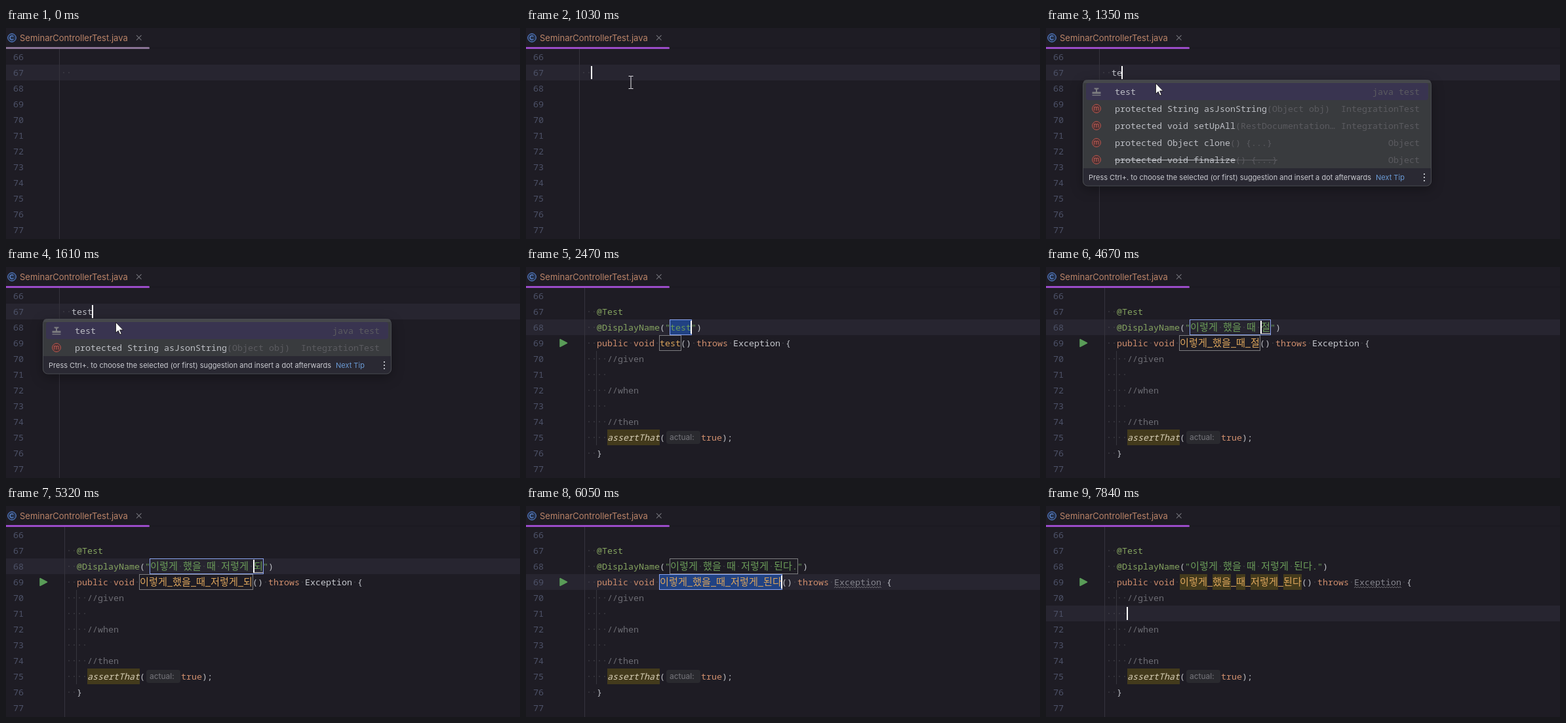
An HTML page that plays this animation: 784 by 322 pixels, repeating every 8370 ms.

```html
<!DOCTYPE html>
<html lang="ko">
<head>
<meta charset="utf-8">
<title>Live template</title>
<style>
html, body { margin: 0; width: 100%; height: 100%; overflow: hidden; background: #1e1c24; }
svg { display: block; }
text { white-space: pre; }
.mono { font: 13.333px "Noto Sans Mono", monospace; }
.ko { font: 15.2px "Noto Sans CJK KR", "Noto Sans CJK", sans-serif; }
.ui { font-family: Inter, sans-serif; }
.it { font-style: italic; }
.popup { filter: drop-shadow(0 5px 9px rgba(0,0,0,.3)); }
</style>
</head>
<body>
<svg id="stage" width="784" height="322" viewBox="0 0 784 322"></svg>
<script>
(() => {
const LOOP = 8370, ROW = 24, CH = 8, KO = 14;
const stage = document.getElementById('stage');
const C = {
  plain: '#bcbec4', note: '#86a560', str: '#6a9b58', key: '#cf8e6d', fn: '#dca55c',
  comment: '#6c6c73', dim: '#5b5b60', dot: '#56565e', warn: '#433a1c', box: '#7d7d80',
  active: '#8aa4f0', select: '#214283', caret: '#ffffff'
};
const sentence = '이렇게 했을 때 저렇게 된다.';

// [time, committed length, syllable being composed]
const typing = [
  [2540, 0, 'ㅇ'], [2680, 0, '이'], [2880, 0, '일'], [2980, 1, '러'], [3070, 1, '렇'],
  [3160, 2, 'ㄱ'], [3250, 2, '게'], [3380, 4, ''], [3540, 4, 'ㅎ'], [3610, 4, '해'],
  [3740, 4, '했'], [3870, 5, 'ㅇ'], [4010, 5, '으'], [4080, 5, '을'], [4210, 7, ''],
  [4280, 7, 'ㄸ'], [4350, 7, '때'], [4460, 9, ''], [4540, 9, 'ㅈ'], [4600, 9, '저'],
  [4670, 9, '절'], [4800, 10, '러'], [4860, 10, '렇'], [4930, 11, 'ㄱ'], [5000, 11, '게'],
  [5060, 13, ''], [5120, 13, 'ㄷ'], [5260, 13, '되'], [5330, 13, '된'], [5400, 14, 'ㄷ'],
  [5530, 14, '다'], [5600, 16, '']
];

// [name, tail, type, letters typed while still listed]
const suggestions = [
  ['test', '', 'java test', 4],
  ['protected String asJsonString', '(Object obj)', 'IntegrationTest', 4],
  ['protected void setUpAll', '(RestDocumentation…', 'IntegrationTest', 3],
  ['protected Object clone', '() {...}', 'Object', 2],
  ['protected void finalize', '() {...}', 'Object', 2]
];

const rowY = n => 32 + (n - 66) * ROW;
const isKo = c => /^[ㄱ-힣]/.test(c);
const width = s => [...s].reduce((w, c) => w + (isKo(c) ? KO : CH), 0);
const rect = (x, y, w, h, fill, more = '') =>
  `<rect x="${x}" y="${y}" width="${w}" height="${h}" fill="${fill}" ${more}/>`;
const outline = (x, y, w, color) =>
  rect(x - .5, y + .5, w + 1, ROW - 1, 'none', `stroke="${color}"`);
const path = (d, fill, more = '') => `<path d="${d}" fill="${fill}" ${more}/>`;
const text = (x, y, s, fill, cls = 'mono', more = '') =>
  `<text x="${x}" y="${y}" class="${cls}" fill="${fill}" ${more}>${s}</text>`;
const ui = (x, y, s, fill, size) => text(x, y, s, fill, 'ui', `font-size="${size}"`);
const dot = (x, n) => rect(x + 3.4, rowY(n) + 11.5, 1.2, 1.2, C.dot);
const dots = (x, n, count) =>
  Array.from({ length: count }, (_, i) => dot(x + i * CH, n)).join('');
const caret = (x, n) => rect(x - 1, rowY(n) + 2, 2, 20, C.caret);

// Lays out coloured pieces on one line, marking blanks with dots.
function code(x, n, ...pieces) {
  let out = '';
  for (const [s, color, cls = ''] of pieces) {
    for (const run of s.match(/[ㄱ-힣]+| |[^ㄱ-힣 ]+/g) || []) {
      out += run === ' ' ? dot(x, n)
        : text(x, rowY(n) + 17, run, color, (isKo(run) ? 'ko ' : 'mono ') + cls);
      x += width(run);
    }
  }
  return out;
}

function chrome(focused, gutter) {
  let out = rect(0, 30, 784, 1, '#19181f');
  out += '<circle cx="9" cy="15" r="6.3" fill="#25324d" stroke="#5c8be0"/>';
  out += path('M11.3 13A3 3 0 1 0 11.3 17', 'none', 'stroke="#6d9bea" stroke-width="1.1"');
  out += ui(21, 20, 'SeminarControllerTest.java', '#bb8468', 13);
  out += path('M199 11.2l7.5 7.5m0-7.5l-7.5 7.5', 'none', 'stroke="#73737a" stroke-width="1.1"');
  out += rect(-3, 29, 222, 3, focused ? '#9a4bc8' : '#8a7396', 'rx="1.5"');
  out += rect(gutter, 32, 1, 290, '#35333d');
  for (let n = 66; n < 78; n++) out += text(11, rowY(n) + 17, n, '#4d5268');
  return out;
}

function popup(rows) {
  const foot = 84 + rows.length * 26;
  let out = rect(56.5, 79.5, 531, foot - 52.5, '#393b3e', 'rx="7"');
  out += path('M57 84v-1a4 4 0 0 1 4-3.5h522a4 4 0 0 1 4 3.5v1z', '#46484b');
  out += rect(61, 84, 522, 26, '#393450', 'rx="4"');
  rows.forEach(([name, tail, type], i) => {
    const y = 97 + i * 26, end = 105 + width(name);
    if (i === 0) {
      out += path('M73.5 91.500h7v1.500l-2.500 1v3.500h5.500v3h-13v-3h5.500v-3.500l-2.500-1zM70.500 102h13v1.300h-13z', '#7d7d80');
    } else {
      out += `<circle cx="77" cy="${y}" r="6.4" fill="#4a3032" stroke="#c05a50"/>`;
      out += text(77, y + 3.3, 'm', '#d2675c', 'ui', 'font-size="10" text-anchor="middle"');
    }
    out += text(105, y + 5, name, C.plain) + text(end, y + 5, tail, C.dim);
    out += text(570 - width(type), y + 5, type, C.dim);
    if (name.endsWith('finalize')) {
      out += rect(105, y, end - 105, 1, C.plain) + rect(end, y, width(tail), 1, C.dim);
    }
  });
  out += path(`M57 ${foot}h530v19a8 8 0 0 1-8 8h-514a8 8 0 0 1-8-8z`, '#2a2933');
  out += ui(65, foot + 18, 'Press Ctrl+. to choose the selected (or first) suggestion and insert a dot afterwards', '#c9cad0', 11);
  out += ui(503, foot + 18, 'Next Tip', '#6b9bd6', 11);
  for (const d of [9, 14, 19]) out += rect(576, foot + d - 1, 2, 2, C.plain);
  out += rect(56.5, 79.5, 531, foot - 52.5, 'none', 'rx="7" stroke="#484a50"');
  return `<g class="popup">${out}</g>`;
}

// The pointer advances in short hops that slow down near the end.
function hop(t, start, hops, from, to) {
  const k = Math.min(hops, Math.floor((t - start) / 70 + .01)) / hops;
  const e = 1 - (1 - k) ** 2;
  return from.map((v, i) => Math.round(v + (to[i] - v) * e));
}

function pointer(t) {
  if (t < 130) return '';
  if (t >= 1350) {
    return path('M167.500 84.500v16l3.700-3.500 2.600 6 2.400-1-2.600-5.900h5z', '#fff', 'stroke="#111" stroke-width=".8"');
  }
  const [x, y] = t < 890 ? hop(t, 130, 7, [440, 268], [100, 79])
    : hop(t, 890, 3, [100, 79], [167, 84]);
  return path(`M${x - 3.5} ${y - 9.5}h3l.5 .5 .5-.5h3M${x} ${y - 9}v18M${x - 3.5} ${y + 9.5}h3l.5-.5 .5 .5h3`,
    'none', 'stroke="#e8e8ec"');
}

function opening(t) {
  const typed = 'test'.slice(0, [1290, 1350, 1480, 1610].filter(s => t >= s).length);
  let out = rect(0, rowY(67), 784, ROW, '#272530') + chrome(t >= 890, 81);
  out += dots(84, 67, 2) + code(100, 67, [typed, C.plain]);
  if (t >= 890) out += caret(100 + width(typed), 67);
  if (t >= 1350) out += popup(suggestions.filter(s => s[3] >= typed.length));
  return out + pointer(t);
}

function editing(t) {
  const step = typing.filter(s => t >= s[0]).pop();
  const done = step ? sentence.slice(0, step[1]) : 'test';
  const composing = step ? step[2] : '';
  const title = done + composing;
  const method = title.replace(/\./g, '').replace(/ /g, '_');
  const tw = width(title), mw = width(method);
  const naming = t >= 5720 && t < 6590, finished = t >= 6590;
  const ready = t >= 2140, unused = t >= 6050;
  const line = finished ? 71 : naming ? 69 : 68;

  let out = rect(0, rowY(line), 784, ROW, '#272530') + chrome(true, 89);
  out += rect(107, rowY(70), 1, 6 * ROW, '#37363e');
  for (const n of [67, 68, 69, 76]) out += dots(92, n, 2);
  for (let n = 70; n < 76; n++) out += dots(92, n, 4);

  if (!step) out += rect(220, rowY(68), tw, ROW, C.select);
  if (naming) out += rect(204, rowY(69), mw, ROW, C.select);
  if (finished) {
    let x = 204;
    for (const word of method.split('_')) {
      out += rect(x, rowY(69), width(word), ROW, C.warn);
      x += width(word) + CH;
    }
  }
  if (ready) out += rect(124, rowY(75), 80, ROW, C.warn);

  out += code(108, 67, ['@Test', C.note]);
  out += code(108, 68, ['@DisplayName', C.note], ['(', C.plain], ['"' + title + '"', C.str], [')', C.plain]);
  out += code(108, 69, ['public void ', C.key], [method, C.fn], ['() ', C.plain], ['throws ', C.key],
    ['Exception', unused ? '#85858d' : '#c6c8ce'], [' {', C.plain]);
  ['given', 'when', 'then'].forEach((s, i) => out += code(124, 70 + i * 2, ['//' + s, C.comment]));
  out += code(124, 75, ['assertThat', '#d6cdb4', 'it'], ['(', C.plain]);
  out += code(ready ? 267 : 212, 75, ['true', C.key], [');', C.plain]);
  out += code(108, 76, ['}', C.plain]);

  if (ready) {
    out += rect(214, rowY(75) + 2, 52, 20, '#2a2a2f', 'rx="4"');
    out += ui(219, rowY(75) + 16, 'actual:', '#76767c', 12);
    out += path('M52 110.500v11l10.500-5.500z', '#5a9c58', 'stroke="#5a9c58" stroke-width="1.500" stroke-linejoin="round"');
  }
  if (unused) {
    const wx = 204 + mw + 80;
    out += path(`M${wx} 125` + 'l2-2l2 2'.repeat(18), 'none', 'stroke="#74747a" stroke-width=".9"');
  }
  if (!finished) {
    const a = outline(220, rowY(68), tw, naming ? C.box : C.active);
    const b = outline(204, rowY(69), mw, naming ? C.active : C.box);
    out += naming ? a + b : b + a;
  }
  if (composing) out += rect(220 + width(done), rowY(68) + 21, KO, 1, '#d0d2d8');

  if (naming) out += caret(204 + mw, 69);
  else if (!finished) out += caret(220 + width(done), 68);
  else if (t < 7390 || t >= 7840) out += caret(124, 71);
  return out;
}

let last = '';
function render(t) {
  const next = t < 1810 ? opening(t) : editing(t);
  if (next !== last) stage.innerHTML = last = next;
}

const begin = performance.now();
function tick() {
  render((performance.now() - begin) % LOOP);
  requestAnimationFrame(tick);
}
tick();
})();
</script>
</body>
</html>
```
